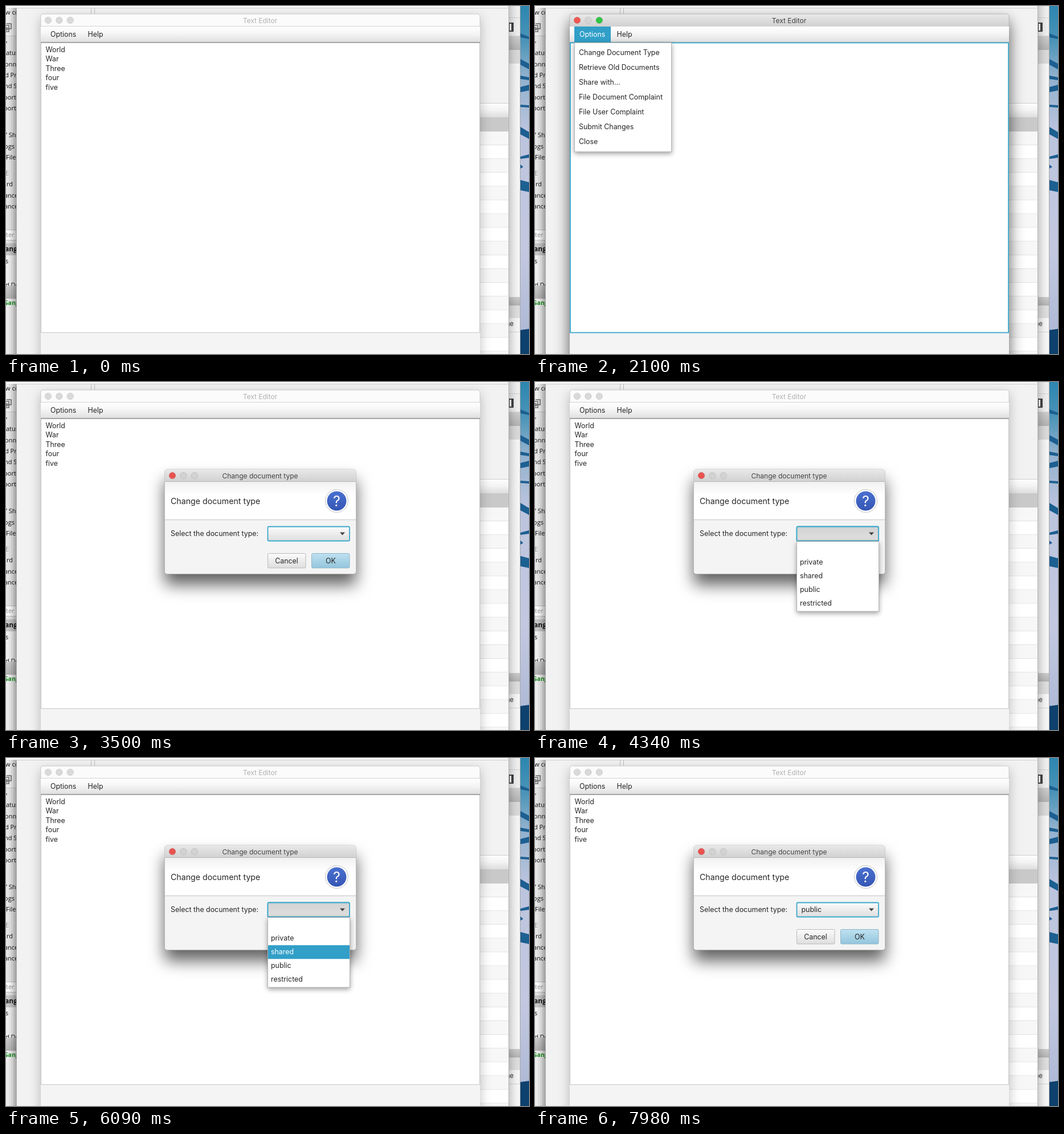
An HTML page for the animation above (8000 ms loop, 918 px wide and 610 px high).

```html
<!DOCTYPE html>
<html lang="en">
<head>
<meta charset="utf-8">
<title>Text Editor</title>
<style>
  html, body { margin: 0; width: 100%; height: 100%; overflow: hidden; background: #ececec; }
  svg { display: block; width: 100vw; height: 100vh; }
  text { font: 12.4px Inter, "Open Sans", sans-serif; fill: #262626; white-space: pre; }
  .title { font-size: 12px; fill: #444; text-anchor: middle; }
  .faded { fill: #b0b0b0; }
  .white, .picked { fill: #fff; }
  .mid { text-anchor: middle; }
  #side text { font: 11px "Open Sans", "Noto Sans", sans-serif; fill: #111; }
  #side .bold { font-weight: 700; font-size: 12px; }
  #side .pale { fill: #999; }
  #side .green { fill: #16901a; font-weight: 700; font-size: 10.5px; }
  .back { filter: drop-shadow(0 8px 10px rgba(0,0,0,.36)); }
  .calm { filter: drop-shadow(0 7px 10px rgba(0,0,0,.25)); }
  .deep { filter: drop-shadow(0 18px 14px rgba(0,0,0,.45)); }
  .float { filter: drop-shadow(0 19px 14px rgba(0,0,0,.62)); }
  .popup { filter: drop-shadow(0 3px 4px rgba(0,0,0,.38)); }
</style>
</head>
<body>
<svg viewBox="0 0 918 610" xmlns="http://www.w3.org/2000/svg">
  <defs>
    <linearGradient id="bar" x2="0" y2="1"><stop stop-color="#e9e9e9"/><stop offset="1" stop-color="#d0d0d0"/></linearGradient>
    <linearGradient id="menu" x2="0" y2="1"><stop stop-color="#fff"/><stop offset=".45" stop-color="#f5f5f5"/><stop offset="1" stop-color="#dedede"/></linearGradient>
    <linearGradient id="head" x2="0" y2="1"><stop stop-color="#f1f1f1"/><stop offset=".35" stop-color="#fff"/><stop offset="1" stop-color="#fff"/></linearGradient>
    <linearGradient id="button" x2="0" y2="1"><stop stop-color="#fbfbfb"/><stop offset="1" stop-color="#dedede"/></linearGradient>
    <linearGradient id="pressed" x2="0" y2="1"><stop stop-color="#d2d2d2"/><stop offset="1" stop-color="#e0e0e0"/></linearGradient>
    <linearGradient id="ok" x2="0" y2="1"><stop stop-color="#bfe1f0"/><stop offset="1" stop-color="#93c5dd"/></linearGradient>
    <linearGradient id="band" x2="0" y2="1"><stop stop-color="#cfcfcf"/><stop offset="1" stop-color="#b4b4b4"/></linearGradient>
    <linearGradient id="blue" x2="0" y2="1"><stop stop-color="#4a70d0"/><stop offset="1" stop-color="#3556b4"/></linearGradient>
    <linearGradient id="ice" x2="0" y2="1">
      <stop stop-color="#2d86b0"/><stop offset=".1" stop-color="#4a94b8"/><stop offset=".2" stop-color="#8fb0cd"/>
      <stop offset=".36" stop-color="#bcc4de"/><stop offset=".7" stop-color="#c3c8e0"/><stop offset="1" stop-color="#a9b6d4"/>
    </linearGradient>
    <clipPath id="sideClip"><path d="M0 0H18.500V610H0z"/></clipPath>
  </defs>

  <!-- wallpaper -->
  <path fill="url(#ice)" d="M903 0h15v610h-15z"/>
  <g fill="#1c5f91">
    <path d="M903 48l15 6v4l-15-3zM903 93l15 8v10l-15-8zM903 122l15 3v5l-15-2zM903 142l15-4v10l-15 3zM903 173l15 1v4l-15-1z"/>
    <path d="M903 212l15 9v12l-15-8zM903 264l15-4v6l-15 2zM903 278l5 4-5 3zM903 305l15 4v17l-15-3z"/>
    <path fill="#0e416e" d="M903 568l15-2v44h-15z"/>
  </g>

  <!-- rear window -->
  <path fill="#ececec" d="M0 0h903v610H0z"/>
  <g id="right">
    <path fill="#f1f1f1" d="M882 0h21v20h-21z"/>
    <path fill="#d6d6d6" d="M882 20h21v33h-21z"/>
    <path fill="#f0f0f0" d="M882 21h21v31h-21z"/>
    <path fill="#444" d="M883 29h8v16h-8z"/>
    <path fill="#fff" d="M884 31h3v12h-3z"/>
    <path fill="url(#band)" d="M882 53h21v24h-21z"/>
    <path fill="#dcdcdc" d="M882 77h21v24h-21z"/>
    <path fill="#f7f7f7" d="M882 101h21v409h-21z"/>
    <path fill="url(#band)" d="M882 510h21v15h-21z"/>
    <path fill="#e0e0e0" d="M882 525h21v22h-21z"/>
    <path fill="#f8f8f8" d="M882 547h21v63h-21z"/>
    <path stroke="#d8d8d8" d="M882 571.500h21"/>
    <text x="878" y="561" style="font-size:11px">ne</text>
    <path stroke="#aaa" d="M902.500 0V610"/>
  </g>
  <g id="side" clip-path="url(#sideClip)">
    <path fill="#f2f2f2" d="M0 0h19v53H0z"/>
    <path fill="#e9e9e9" d="M0 53h19v437H0z"/>
    <path fill="#fff" stroke="#c4c4c4" d="M-5 392.500h30v18H-5z"/>
    <path fill="#cacaca" d="M0 416h19v21H0z"/>
    <path fill="#f3f3f3" d="M0 437h19v53H0z"/>
    <path fill="none" stroke="#666" stroke-width="1.500" d="M1 31h8v9H1M-2 34h7v11h-7"/>
    <circle cx="1" cy="40" r="3" fill="#888"/>
    <path stroke="#ccc" d="M0 52.500h19"/>
  </g>

  <!-- middle window -->
  <path class="back" fill="#f2f2f2" d="M18.500-20H882.500V640H18.500z"/>
  <path fill="#fcfcfc" d="M0 0H883V3H0z"/>
  <path stroke="#c9c9c9" d="M18 3.500H883"/>
  <path stroke="#bdbdbd" d="M149.500 4v10M155.500 4v10"/>
  <path stroke="#b4b4b4" d="M18.500 4V610M882.500 0V610"/>
  <g id="rows"></g>

  <!-- editor -->
  <path class="calm" fill="#f4f4f4" d="M61 640V19q0-5 5-5H827q5 0 5 5V640z"/>
  <path data-on="1750 2660" class="deep" fill="#f4f4f4" d="M61 640V19q0-5 5-5H827q5 0 5 5V640z"/>
  <path fill="#fbfbfb" stroke="#c2c2c2" stroke-width=".8" d="M61 36V19q0-5 5-5H827q5 0 5 5V36z"/>
  <g data-on="0 1750, 2660 8000">
    <text class="title faded" x="446" y="30">Text Editor</text>
    <g class="lights" data-x="74" data-y="25" data-fill="#d9d9d9 #d9d9d9 #d9d9d9"></g>
  </g>
  <g data-on="1750 2660">
    <path fill="url(#bar)" stroke="#b5b5b5" stroke-width=".8" d="M61 36V19q0-5 5-5H827q5 0 5 5V36z"/>
    <text class="title" x="446" y="30">Text Editor</text>
    <g class="lights" data-x="74" data-y="25" data-fill="#ee5852 #d4d4d4 #32c546"></g>
  </g>
  <path fill="url(#menu)" d="M61 36H832V64H61z"/>
  <path stroke="#d2d2d2" d="M61 35.500H832"/>
  <path fill="#fff" d="M61.500 65H831.500V572.500H61.500z"/>
  <path fill="none" stroke="#c6c6c6" d="M61.500 64V572.500H831.500V64"/>
  <path stroke="#8c8c8c" stroke-width="1.500" d="M61 64H832"/>
  <path data-on="1750 2940" fill="none" stroke="#4cafd0" stroke-width="2" d="M62 64.500H831V572.500H62z"/>
  <text x="78" y="54">Options</text>
  <g data-on="1260 2940">
    <path fill="#319fc8" d="M69 36h64v27.500H69z"/>
    <text class="white" x="78" y="54">Options</text>
  </g>
  <text x="143.500" y="54">Help</text>
  <g id="lines" data-on="0 1750, 2660 8000"></g>
  <path data-on="2660 2940" stroke="#222" d="M69.500 68v17"/>

  <!-- options menu -->
  <g data-on="1820 2660">
    <path class="popup" fill="#fff" stroke="#b4b4b4" d="M69.500 64.500H239.500V255.500H69.500z"/>
    <g id="options"></g>
    <g data-on="2310 2660">
      <path fill="#319fc8" d="M70 69H239V95H70z"/>
      <text class="white" x="77" y="86">Change Document Type</text>
    </g>
  </g>

  <!-- dialog -->
  <g data-on="2660 8000">
    <rect class="float" x="278.500" y="153" width="336" height="183.500" rx="5" fill="#ebebeb"/>
    <rect x="278.500" y="153" width="336" height="183.500" rx="5" fill="#ebebeb" stroke="#a9a9a9" stroke-width=".7"/>
    <path fill="url(#bar)" d="M278.500 175V158q0-5 5-5H609.500q5 0 5 5V175z"/>
    <path stroke="#b8b8b8" d="M278.500 174.500h336"/>
    <text class="title" x="446" y="168.500">Change document type</text>
    <g class="lights" data-x="292" data-y="164" data-fill="#e9524f #d2d2d2 #d2d2d2"></g>

    <g data-on="2940 8000">
      <path fill="#f4f4f4" d="M279 175H614V332q0 4-4 4H283q-4 0-4-4z"/>
      <path fill="url(#head)" d="M279 175H614V241H279z"/>
      <path stroke="#c3c3c3" d="M279 241.500H614"/>
      <text x="289" y="214" style="font-size:14.200px">Change document type</text>
      <circle cx="580.500" cy="208.500" r="20" fill="#fff" stroke="#c2c2c2"/>
      <circle cx="580.500" cy="208.500" r="17" fill="url(#blue)"/>
      <text class="white mid" x="580.500" y="217.500" style="font-size:25px">?</text>
      <text x="289" y="270">Select the document type:</text>
      <rect x="459.500" y="300.500" width="66.500" height="25.500" rx="2" fill="url(#button)" stroke="#b9b9b9"/>
      <text class="mid" x="492.500" y="317.500">Cancel</text>
      <rect x="536.500" y="300.500" width="66.500" height="25.500" rx="2" fill="url(#ok)" stroke="#8fb5c8"/>
      <text class="mid" x="570" y="317.500">OK</text>
      <rect x="459.500" y="253.500" width="143.500" height="25" rx="2" fill="url(#button)" stroke="#3ea9cd" stroke-width="1.800"/>
      <rect data-on="3850 7350" x="459.500" y="253.500" width="143.500" height="25" rx="2" fill="url(#pressed)" stroke="#3ea9cd" stroke-width="1.800"/>
      <path fill="#444" d="M586 263.500h9l-4.500 5z"/>
      <text data-on="7350 8000" x="467.500" y="270">public</text>
      <g data-on="3850 7350">
        <path class="popup" fill="#fff" stroke="#b4b4b4" d="M459.500 279.500H603.500V402H459.500z"/>
        <g id="types"></g>
      </g>
    </g>
  </g>
</svg>
<script>
  const LOOP = 8000;
  const $ = id => document.getElementById(id);

  function add(parent, tag, attrs, label) {
    const node = document.createElementNS('http://www.w3.org/2000/svg', tag);
    for (const key in attrs) node.setAttribute(key, attrs[key]);
    if (label) node.textContent = label;
    return parent.appendChild(node);
  }

  function list(id, labels, x, y, step) {
    labels.forEach((label, i) => add($(id), 'text', { x, y: y + i * step }, label));
  }

  // Visible ends of the sidebar entries: label, x, baseline, style
  [
    ['w cc', -1, 15], ['‘', 0, 70], ['atus', 0, 86], ['onne', -2, 106], ['d Pr', -2, 125],
    ['nd S', -3, 144], ['port', -4, 164], ['port', -4, 183], ['’ Sh', 0, 230], ['ogs', -3, 250],
    ['File', 0, 269], ['E', -1, 297, 'pale'], ['rd', 1, 316], ['ance', -3, 336], ['ance', -3, 355],
    ['ter', 0, 405, 'pale'], ['ang', -2, 430, 'bold'], ['s', -1, 451], ['d Do', -1, 493]
  ].forEach(([label, x, y, style = '']) => add($('side'), 'text', { x, y, class: style }, label));
  add($('side'), 'path', { d: 'M0 490h19v23H0z', fill: 'url(#band)' });
  add($('side'), 'path', { d: 'M0 513h19v97H0z', fill: '#f0f0f0' });
  add($('side'), 'text', { x: -4, y: 524, class: 'green' }, 'Gang');
  [.02, .04, .07, .1].forEach((opacity, i) =>
    add($('side'), 'rect', { x: 5 + i * 4, y: 0, width: 14, height: 610, 'fill-opacity': opacity }));

  // Table behind the editor
  const band = (y, height, fill) => add($('rows'), 'rect', { x: 820, y, width: 62, height, fill });
  band(170, 25, 'url(#menu)');
  band(195, 25, '#c9c9c9');
  for (let i = 0; i < 17; i++) {
    const y = 220 + i * 24.1;
    band(y, 24.1, i % 2 ? '#fff' : '#f7f7f7');
    band(y + 23.1, 1, '#e2e2e2');
  }
  band(170, 1, '#cfcfcf');

  document.querySelectorAll('.lights').forEach(group => {
    const { x, y, fill } = group.dataset;
    fill.split(' ').forEach((color, i) => add(group, 'circle', {
      cx: +x + i * 19.4, cy: y, r: 5.8, fill: color, stroke: '#000', 'stroke-opacity': .12, 'stroke-width': .8
    }));
  });

  list('lines', ['World', 'War', 'Three', 'four', 'five'], 69.5, 81, 16.4);
  list('options', ['Change Document Type', 'Retrieve Old Documents', 'Share with...',
    'File Document Complaint', 'File User Complaint', 'Submit Changes', 'Close'], 77, 86, 26.05);

  const hover = { private: '5180 5600', shared: '5600 6580', public: '6580 7350' };
  ['private', 'shared', 'public', 'restricted'].forEach((label, i) => {
    const place = { x: 465, y: 320 + i * 24.15 };
    add($('types'), 'text', place, label);
    if (!hover[label]) return;
    const row = add($('types'), 'g', { 'data-on': hover[label] });
    add(row, 'rect', { x: 460, y: place.y - 16, width: 143, height: 24.1, fill: '#319fc8' });
    add(row, 'text', { ...place, class: 'picked' }, label);
  });

  const timed = [...document.querySelectorAll('[data-on]')].map(node => ({
    node, spans: node.dataset.on.split(',').map(span => span.trim().split(' ').map(Number))
  }));

  const start = performance.now();
  function draw() {
    const t = (performance.now() - start) % LOOP;
    for (const { node, spans } of timed) {
      node.style.display = spans.some(([from, to]) => t >= from && t < to) ? '' : 'none';
    }
    requestAnimationFrame(draw);
  }
  draw();
</script>
</body>
</html>
```
